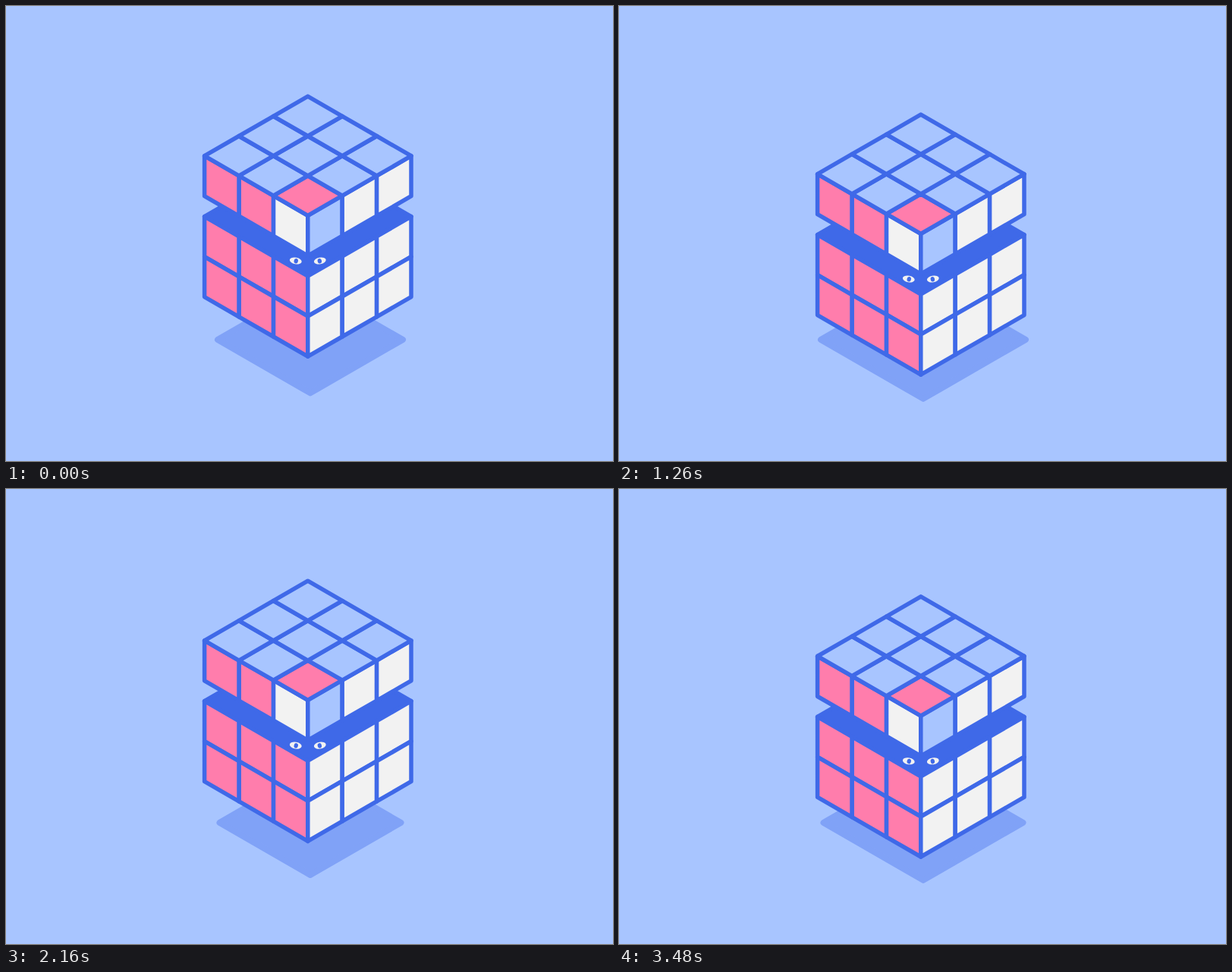
These frames come from a looping animation (800x600 px, 4500 ms). An HTML page:

```html
<!DOCTYPE html>
<html lang="en">
<head>
<meta charset="utf-8">
<title>Floating cube</title>
<style>
  html, body { margin: 0; width: 100%; height: 100%; overflow: hidden; background: #a8c5ff; }
  svg { display: block; width: 800px; height: 600px; }
</style>
</head>
<body>
<svg viewBox="0 0 800 600">
  <polygon id="shadow" fill="#80a2f7" stroke="#80a2f7" stroke-width="8" stroke-linejoin="round"/>
  <g id="cube" stroke="#3f69e8" stroke-width="5.5" stroke-linejoin="round"></g>
</svg>
<script>
const SKY = '#a8c5ff', PINK = '#ff7dac', WHITE = '#f2f2f2', LINE = '#3f69e8';
const LOOP = 4500, STEP = 30, LAST = 3480;

// Isometric cell: half width, half height and height
const CX = 397.8, W = 45.4, H = 26.2, C = 53;
const LEFT = [-W, -H], RIGHT = [W, -H], DOWN = [0, C];

const shadow = document.getElementById('shadow');
const cube = document.getElementById('cube');

function add(name, attrs) {
  const el = document.createElementNS('http://www.w3.org/2000/svg', name);
  for (const key in attrs) el.setAttribute(key, attrs[key]);
  cube.appendChild(el);
}

function quad(x, y, u, v, fill) {
  const points = [[0, 0], [1, 0], [1, 1], [0, 1]].map(([a, b]) =>
    [x + a * u[0] + b * v[0], y + a * u[1] + b * v[1]].join());
  add('polygon', { points: points.join(' '), fill });
}

// Grid of cells that starts at the front edge; the first cell may differ
function face(y, u, v, cols, rows, fill, first = fill) {
  for (let j = 0; j < rows; j++) {
    for (let i = 0; i < cols; i++) {
      quad(CX + i * u[0] + j * v[0], y + i * u[1] + j * v[1], u, v, i + j ? fill : first);
    }
  }
}

function eye(side) {
  const x = CX + side * 16, turn = `rotate(${-side * 10} ${x} 336)`;
  add('ellipse', { cx: x, cy: 336, rx: 8, ry: 4.4, fill: WHITE, stroke: 'none', transform: turn });
  add('ellipse', { cx: x - side * 0.5, cy: 336.2, rx: 2.7, ry: 3.3, fill: LINE, stroke: 'none', transform: turn });
}

function buildCube() {
  const base = 356.2, top = 276.3;
  quad(CX, base, LEFT.map(n => n * 3), RIGHT.map(n => n * 3), LINE);
  face(base, LEFT, DOWN, 3, 2, PINK);
  face(base, RIGHT, DOWN, 3, 2, WHITE);
  face(top, LEFT, DOWN, 3, 1, PINK, WHITE);
  face(top, RIGHT, DOWN, 3, 1, WHITE, SKY);
  face(top, LEFT, RIGHT, 3, 3, SKY, PINK);
  eye(-1);
  eye(1);
}

// Time, drop of the cube, half width of the shadow
const KEYS = [
  [80, 0, 122],
  [1235, 24, 135],
  [2380, 0, 118],
  [3550, 23, 131.6]
];

function pose(t) {
  const n = KEYS.findIndex(key => key[0] > t);
  if (n === 0) return KEYS[0].slice(1);
  const from = KEYS[n - 1], to = KEYS[n];
  const k = (1 - Math.cos(Math.PI * (t - from[0]) / (to[0] - from[0]))) / 2;
  return [1, 2].map(i => from[i] + (to[i] - from[i]) * k);
}

function draw(now) {
  const t = Math.min(Math.floor((now % LOOP) / STEP) * STEP, LAST);
  const [drop, w] = pose(t), h = w * 0.577;
  cube.setAttribute('transform', `translate(0 ${drop.toFixed(2)})`);
  shadow.setAttribute('points', `${401 - w},440 401,${440 - h} ${401 + w},440 401,${440 + h}`);
}

let start;
function tick(now) {
  if (start === undefined) start = now;
  draw(Math.max(0, now - start));
  requestAnimationFrame(tick);
}

buildCube();
draw(0);
requestAnimationFrame(tick);
</script>
</body>
</html>
```
